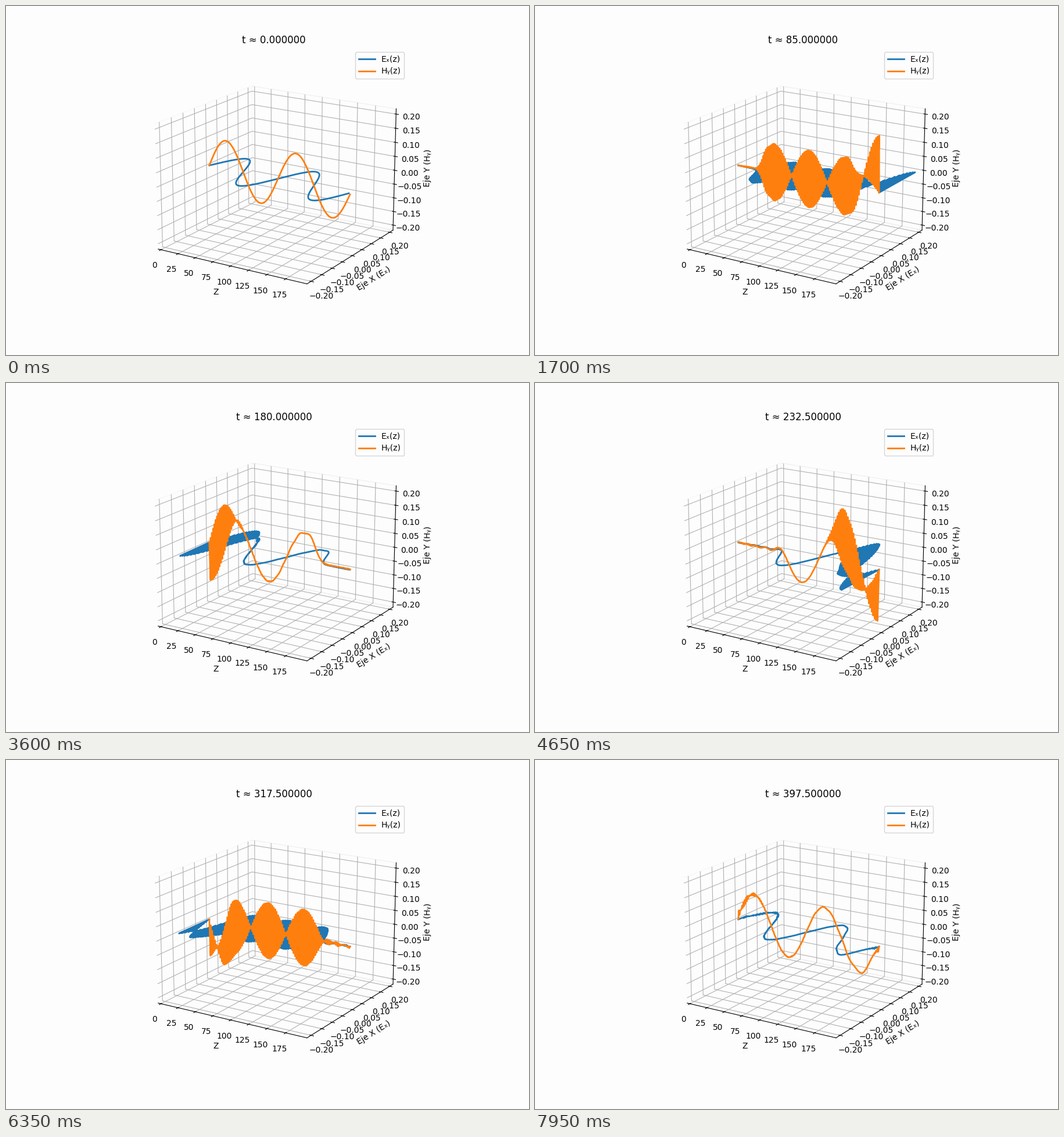
Animation of 900x600 px, one loop 8 s. Source, as a matplotlib script:

```python
import numpy as np
import matplotlib.pyplot as plt
from matplotlib.animation import FuncAnimation

N = 200           # grid points
AMP = 0.1         # wave amplitude
LIM = 2.1 * AMP   # half range of both field axes
DT = 0.5          # time step
STEPS = 5         # time steps per frame
FRAMES = 160
BG = "#fdfdfd"

plt.rcParams.update({
    "axes3d.automargin": True,
    "figure.facecolor": BG,
    "axes.facecolor": BG,
    "font.family": "DejaVu Sans",
})

z = np.arange(N)


def simulate():
    """Leapfrog on one shared grid, both fields held at zero at the ends."""
    ex = AMP * np.sin(4 * np.pi * z / N)
    hy = ex.copy()
    states = []
    for _ in range(FRAMES):
        states.append((ex.copy(), hy.copy()))
        for _ in range(STEPS):
            ex[1:-1] -= DT * (hy[2:] - hy[:-2])
            hy[1:-1] -= DT * (ex[2:] - ex[:-2])
            ex[-1] = hy[-1] = 0
    return states


states = simulate()
flat = np.zeros(N)

fig = plt.figure(figsize=(9, 6), dpi=100)
ax = fig.add_subplot(projection="3d")
ax.view_init(elev=18, azim=-58)

e_line, = ax.plot(z, states[0][0], flat, lw=2, color="#1f77b4", label="Eₓ(z)")
h_line, = ax.plot(z, flat, states[0][1], lw=2, color="#ff7f0e", label="Hᵧ(z)")

ticks = np.linspace(-0.2, 0.2, 9)
ax.set_xticks(np.arange(0, 176, 25))
ax.set_yticks(ticks)
ax.set_zticks(ticks)
ax.set_xlim(0, N - 1)
ax.set_ylim(-LIM, LIM)
ax.set_zlim(-LIM, LIM)
ax.set_xlabel("Z")
ax.set_ylabel("Eje X (Eₓ)")
ax.set_zlabel("Eje Y (Hᵧ)")
for axis in (ax.xaxis, ax.yaxis, ax.zaxis):
    axis.pane.fill = False
ax.legend(loc="upper right")
title = ax.set_title("")


def update(i):
    ex, hy = states[i]
    e_line.set_data_3d(z, ex, flat)
    h_line.set_data_3d(z, flat, hy)
    title.set_text(f"t ≈ {i * STEPS * DT:.6f}")
    return e_line, h_line, title


anim = FuncAnimation(fig, update, frames=FRAMES, interval=50,
                     repeat=True, repeat_delay=0, blit=False)
plt.show()
```
